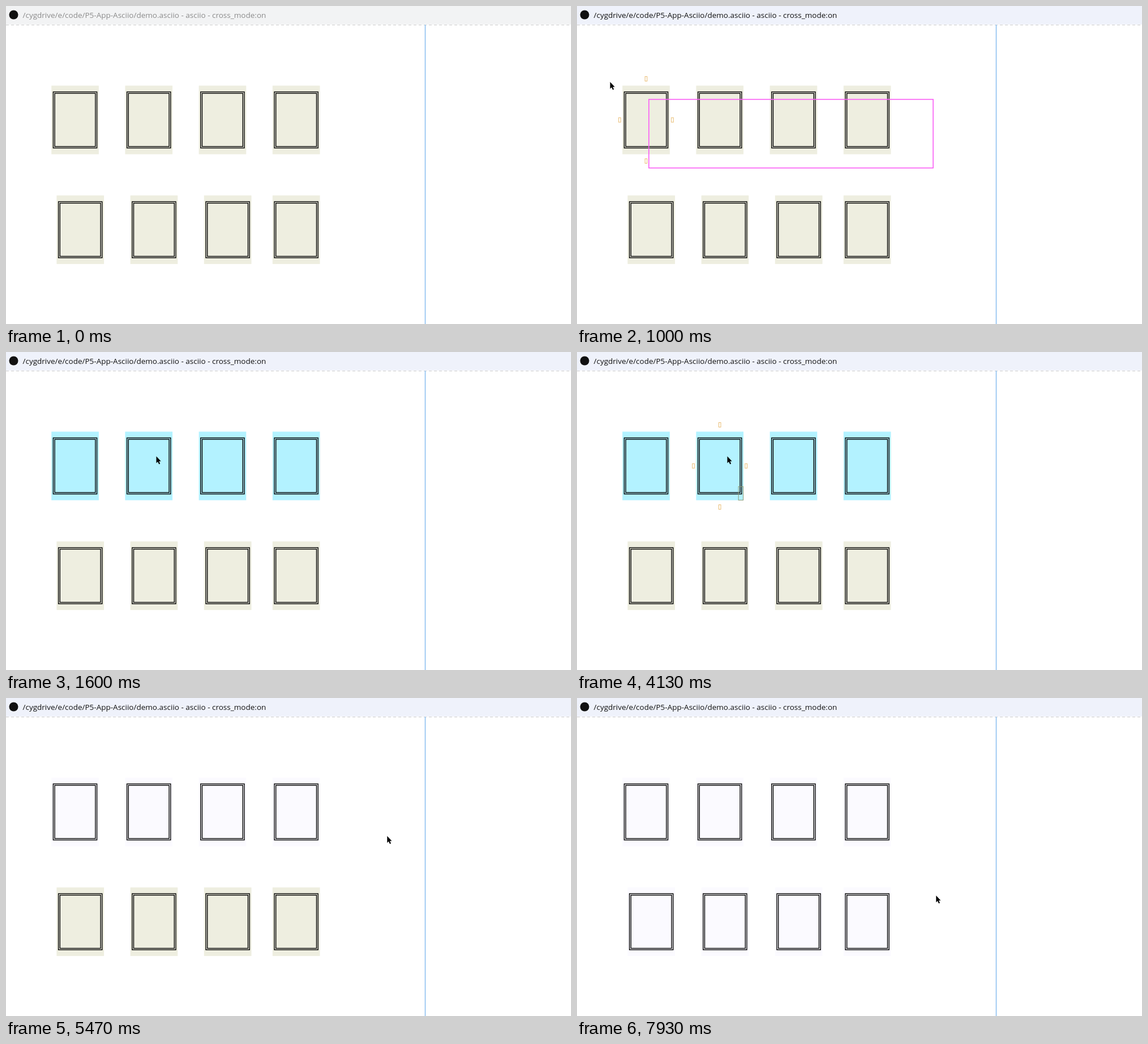
An HTML page with a canvas that plays this animation: 998x561 px, repeating every 8000 ms.

```html
<!DOCTYPE html>
<html lang="en">
<head>
<meta charset="utf-8">
<title>asciio</title>
<style>
  html, body { margin: 0; width: 100%; height: 100%; overflow: hidden; background: #fff; }
  canvas { display: block; }
</style>
</head>
<body>
<canvas id="stage" width="998" height="561"></canvas>
<script>
const ctx = document.getElementById('stage').getContext('2d');
const LOOP = 8000, STEP = 1000 / 15, LAST_STEP = 119;
const BOX = { w: 83.7, h: 121 }, CELL = { w: 9.3, h: 24.2, x: 6, y: 19.5 };
const BEIGE = '#eeeee0', CYAN = '#b3f2ff', PALE = '#fbfaff';
const ROWS = [
  { y: 140.5, xs: [80.2, 210.4, 340.6, 470.8] },
  { y: 334.2, xs: [89.4, 219.6, 349.8, 470.8] },
];

// Key moments, counted in steps
const ENTER = 1, PRESS = 8, SELECT = 21, HOVER = 62, DESELECT = 82, RECOLOR = 101;

// Pointer path: step, x, y, linear?
const PATH = [
  [ENTER, 862, 304], [7, 634, 296], [PRESS, 634, 296], [14, 130, 170, true],
  [15, 58.5, 134], [16, 54, 120], [18, 54, 120], [19, 46, 98], [20, 46, 98],
  [24, 265.5, 184], [71, 265.5, 184], [80, 673.3, 243.5], [109, 673.3, 243.5],
  [113, 757, 167], [115, 757, 167], [LAST_STEP, 634.3, 348.5],
];

function pointerAt(step) {
  const i = PATH.findIndex(key => key[0] >= step);
  const [endStep, x, y, linear] = PATH[i];
  if (i === 0) return { x, y };
  const [startStep, x0, y0] = PATH[i - 1];
  const p = (step - startStep) / (endStep - startStep);
  const k = linear ? p : p * p * (3 - 2 * p);
  return { x: x0 + (x - x0) * k, y: y0 + (y - y0) * k };
}

function snap({ x, y }) {
  return {
    x: CELL.x + Math.floor((x - CELL.x) / CELL.w) * CELL.w,
    y: CELL.y + Math.floor((y - CELL.y) / CELL.h) * CELL.h,
  };
}

function outline(x, y, w, h, color, width) {
  ctx.strokeStyle = color;
  ctx.lineWidth = width;
  ctx.strokeRect(x, y, w, h);
}

function line(x1, y1, x2, y2, color, width, dash = []) {
  ctx.strokeStyle = color;
  ctx.lineWidth = width;
  ctx.setLineDash(dash);
  ctx.beginPath();
  ctx.moveTo(x1, y1);
  ctx.lineTo(x2, y2);
  ctx.stroke();
  ctx.setLineDash([]);
}

function drawWindow(focused) {
  ctx.fillStyle = '#fff';
  ctx.fillRect(0, 0, 998, 561);
  ctx.fillStyle = focused ? '#eff2fb' : '#f2f3f4';
  ctx.fillRect(0, 0, 998, 32.5);
  ctx.fillStyle = '#111';
  ctx.beginPath();
  ctx.arc(13.5, 15.5, 8, 0, Math.PI * 2);
  ctx.fill();
  ctx.fillStyle = focused ? '#111' : '#8b8b8b';
  ctx.font = '13.5px "Open Sans", "Noto Sans", sans-serif';
  ctx.fillText('/cygdrive/e/code/P5-App-Asciio/demo.asciio - asciio - cross_mode:on', 29.5, 20.5);
  line(0, 33.5, 998, 33.5, '#cbcbcb', 1, [5, 4]);
  line(740.5, 33, 740.5, 561, '#8cc0f0', 1.6);
}

function drawBox(x, y, fill) {
  ctx.fillStyle = fill;
  ctx.fillRect(x, y, BOX.w, BOX.h);
  outline(x + 3.2, y + 11, 77.2, 99, '#000', 1.4);
  outline(x + 5.9, y + 13.6, 71.8, 93.8, '#000', 1.4);
}

function drawConnectors(x, y) {
  for (const [dx, dy] of [[41.8, -12], [-4.8, 60.5], [88.3, 60.5], [41.8, 133]])
    outline(x + dx - 1.8, y + dy - 4, 3.6, 8, '#e9bd74', 1);
}

function drawPointer({ x, y }) {
  ctx.fillStyle = '#000';
  ctx.fill(new Path2D(`M${x} ${y}v12l2.7 -2.5 2 4.4 2 -.9 -2 -4.3h3.5z`));
}

function drawSelection(pointer) {
  const from = snap(pointerAt(PRESS)), to = snap(pointer);
  outline(to.x, to.y, from.x - to.x, from.y - to.y, '#fa5cf5', 1.6);
}

function isInside(p, x, y) {
  return p.x >= x && p.x <= x + BOX.w && p.y >= y && p.y <= y + BOX.h;
}

function draw(step) {
  drawWindow(step > PRESS);
  const topFill = step < SELECT ? BEIGE : step < DESELECT ? CYAN : PALE;
  const fills = [topFill, step < RECOLOR ? BEIGE : PALE];
  ROWS.forEach(({ y, xs }, row) => xs.forEach(x => drawBox(x, y, fills[row])));

  // The application reacts one step behind the pointer
  if (step > PRESS && step < SELECT) {
    const seen = pointerAt(step - 1);
    const { y, xs } = ROWS[0];
    xs.filter(x => isInside(seen, x, y)).forEach(x => drawConnectors(x, y));
    drawSelection(seen);
  }
  if (step >= HOVER && step < DESELECT) {
    const x = ROWS[0].xs[1], y = ROWS[0].y;
    drawConnectors(x, y);
    outline(x + 74.8, y + 97, 8.4, 23.8, '#8f9a72', 1);
  }
  if (step >= ENTER) drawPointer(pointerAt(step));
}

function tick() {
  const time = performance.now() % LOOP;
  draw(Math.min(LAST_STEP, Math.floor((time + 4) / STEP)));
  requestAnimationFrame(tick);
}
tick();
</script>
</body>
</html>
```
